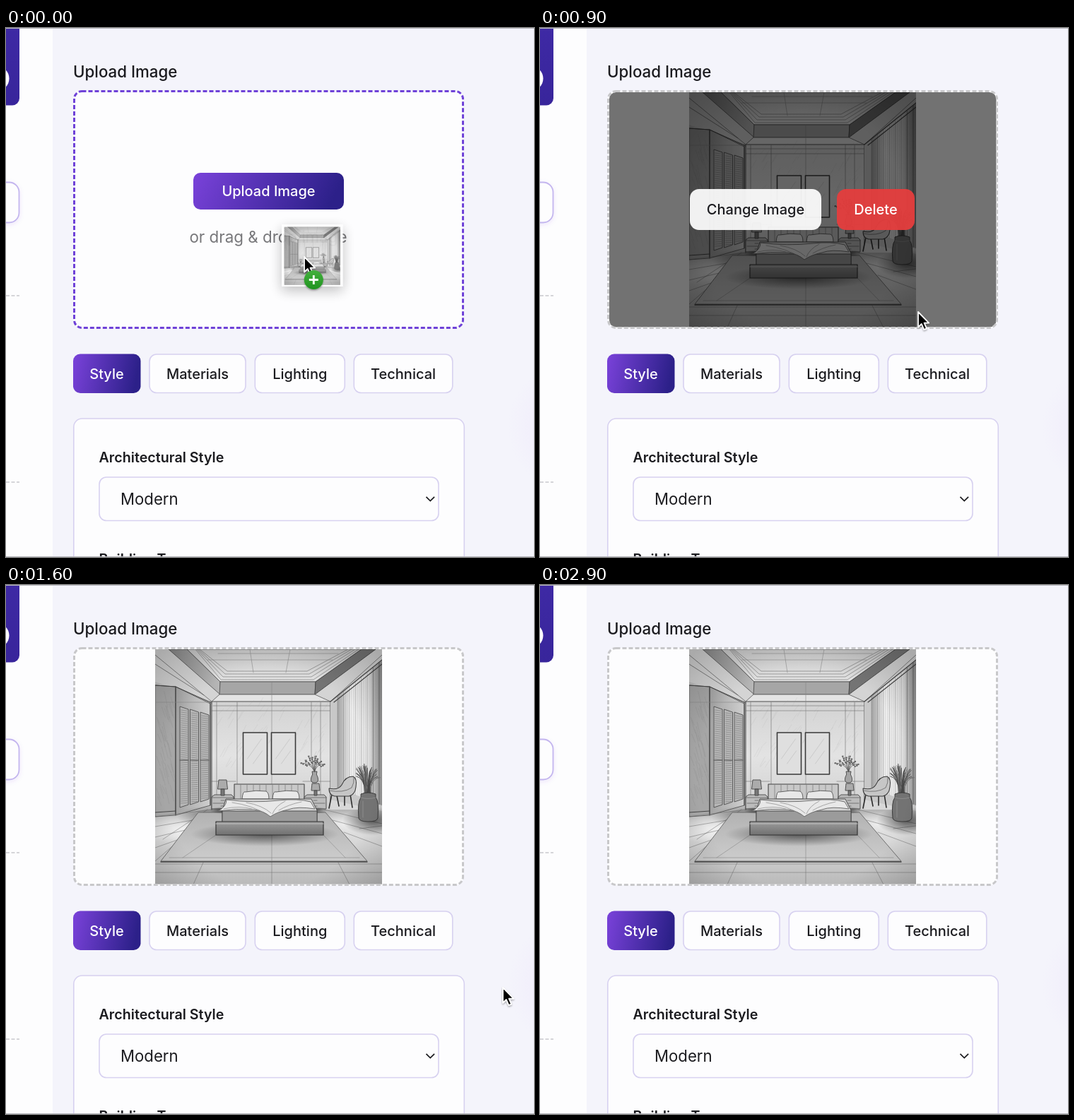
These frames come from a looping animation (747 by 749 pixels, 3 s). An HTML page:

```html
<!DOCTYPE html>
<html lang="en">
<head>
<meta charset="utf-8">
<title>Upload Image</title>
<style>
  html, body { margin: 0; width: 100%; height: 100%; overflow: hidden; background: #f4f4fb; }
  svg { display: block; width: 747px; height: 749px; }
  text { font-family: Inter, Roboto, sans-serif; font-weight: 500; font-size: 20px; fill: #1b1b1f; }
  .mid { text-anchor: middle; }
  .field { fill: #fdfdfe; stroke: #d7d1f0; stroke-width: 1.6; }
</style>
</head>
<body>
<svg id="stage" viewBox="0 0 747 749">
  <defs>
    <linearGradient id="gBrand" y2=".12"><stop stop-color="#7a42da"/><stop offset="1" stop-color="#2c2089"/></linearGradient>
    <linearGradient id="gSide" x2="0" y2="1"><stop stop-color="#3f2aa6"/><stop offset="1" stop-color="#38259b"/></linearGradient>
    <linearGradient id="gWardrobe"><stop stop-color="#a2a2a2"/><stop offset="1" stop-color="#cfcfcf"/></linearGradient>
    <linearGradient id="gCeil" x2="0" y2="1"><stop stop-color="#c6c6c6"/><stop offset="1" stop-color="#e4e4e4"/></linearGradient>
    <linearGradient id="gSoffit"><stop stop-color="#8a8a8a"/><stop offset="1" stop-color="#b8b8b8"/></linearGradient>
    <linearGradient id="gWall" x2="0" y2="1"><stop stop-color="#d2d2d2"/><stop offset=".5" stop-color="#e3e3e3"/><stop offset="1" stop-color="#cfcfcf"/></linearGradient>
    <linearGradient id="gCurtain"><stop stop-color="#a2a2a2"/><stop offset=".3" stop-color="#f2f2f2"/><stop offset=".7" stop-color="#e6e6e6"/><stop offset="1" stop-color="#828282"/></linearGradient>
    <linearGradient id="gFloor" x2="0" y2="1"><stop stop-color="#b4b4b4"/><stop offset=".35" stop-color="#dcdcdc"/><stop offset="1" stop-color="#bababa"/></linearGradient>
    <linearGradient id="gRug" x2="0" y2="1"><stop stop-color="#b2b2b2"/><stop offset="1" stop-color="#cdcdcd"/></linearGradient>
    <linearGradient id="gBase" x2="0" y2="1"><stop stop-color="#9c9c9c"/><stop offset="1" stop-color="#707070"/></linearGradient>
    <radialGradient id="gShade"><stop stop-opacity=".55"/><stop offset="1" stop-opacity="0"/></radialGradient>
    <radialGradient id="gLight"><stop stop-color="#fff" stop-opacity=".7"/><stop offset="1" stop-color="#fff" stop-opacity="0"/></radialGradient>
    <radialGradient id="gEdge" cx=".5" cy=".55" r=".72"><stop offset=".65" stop-opacity="0"/><stop offset="1" stop-opacity=".2"/></radialGradient>
    <radialGradient id="gGlow"><stop offset=".5" stop-color="#f0ebfb" stop-opacity=".7"/><stop offset="1" stop-color="#f0ebfb" stop-opacity="0"/></radialGradient>
    <linearGradient id="gBadge" x2="0" y2="1"><stop stop-color="#43b13d"/><stop offset="1" stop-color="#219321"/></linearGradient>
    <clipPath id="roomClip"><rect x="211" y="91" width="321" height="332.5"/></clipPath>
    <filter id="soft" x="-50%" y="-50%" width="200%" height="200%"><feDropShadow dx="0" dy="6" stdDeviation="9" flood-opacity=".26"/></filter>
    <filter id="thin" x="-50%" y="-50%" width="200%" height="200%"><feDropShadow dx="0" dy="1.5" stdDeviation="1.3" flood-opacity=".35"/></filter>
    <filter id="haze" x="-50%" y="-50%" width="200%" height="200%"><feDropShadow dx="0" dy="2" stdDeviation="3" flood-color="#6f42d8" flood-opacity=".1"/></filter>
    <g id="room" clip-path="url(#roomClip)"></g>
  </defs>

  <rect width="747" height="749" fill="#f4f4fb"/>
  <circle cx="805" cy="565" r="95" fill="url(#gGlow)"/>
  <rect width="66" height="749" fill="#fdfdfe"/>
  <rect x="-40" y="-20" width="59" height="129.5" rx="10" fill="url(#gSide)"/>
  <circle cx="-13" cy="71.5" r="17.5" fill="#fdfdfe"/>
  <rect x="-40" y="218.5" width="58.5" height="57" rx="14" fill="#fdfdfe" stroke="#c3b5ef" stroke-width="1.8" filter="url(#haze)"/>
  <path d="M0 379H19M0 643H19" stroke="#c9c9cd" stroke-width="1.5" stroke-dasharray="5 2.5"/>

  <text x="95" y="70" style="font-size:22.3px">Upload Image</text>
  <rect x="96" y="89" width="551" height="336" rx="12" fill="#fdfdfe"/>
  <g id="prompt">
    <rect x="265" y="205" width="213" height="52" rx="10" fill="url(#gBrand)"/>
    <text class="mid" x="371.5" y="238" style="fill:#fff">Upload Image</text>
    <text class="mid" x="371" y="303.5" style="fill:#77777a;font-weight:400;font-size:22.4px">or drag &amp; drop image</text>
  </g>
  <g id="preview">
    <use href="#room"/>
    <g id="overlay">
      <rect x="98" y="91" width="547.5" height="332.5" rx="9.5" fill="#000" fill-opacity=".55"/>
      <rect x="212" y="228" width="186" height="58" rx="13" fill="#fff" fill-opacity=".92"/>
      <text class="mid" x="305" y="264">Change Image</text>
      <rect x="420" y="228" width="110" height="58" rx="13" fill="#e53e3e" fill-opacity=".95"/>
      <text class="mid" x="475" y="264" style="fill:#fff">Delete</text>
    </g>
  </g>
  <rect id="edge" x="96.5" y="89.5" width="550" height="335" rx="11" fill="none" stroke-width="3" stroke-dasharray="6 3"/>

  <rect x="95" y="461.5" width="95.5" height="55.5" rx="10" fill="url(#gBrand)"/>
  <text class="mid" x="142.5" y="496.5" style="fill:#fff">Style</text>
  <g id="tabs"></g>

  <rect class="field" x="95.8" y="553" width="552.5" height="230" rx="12"/>
  <text x="131.5" y="615" style="font-size:19.7px;font-weight:600">Architectural Style</text>
  <rect class="field" x="132" y="636" width="480" height="61.5" rx="10"/>
  <text x="162" y="675" style="font-size:22.2px;font-weight:400">Modern</text>
  <path d="M594.5 663.8L600.3 669.6L606.1 663.8" fill="none" stroke="#1b1b1f" stroke-width="1.7"/>
  <text x="131.5" y="758.5" style="font-size:19.7px;font-weight:600">Building Type</text>
  <path d="M0 .5H747M0 748.5H747" stroke="#b9b9bf"/>

  <g id="drag">
    <g opacity=".94">
      <rect x="390" y="278" width="86.5" height="88" fill="#fdfdfd" filter="url(#soft)"/>
      <use href="#room" transform="translate(393.5 281.5) scale(.2475) translate(-211 -91)"/>
    </g>
  </g>
  <g id="cursor" filter="url(#thin)">
    <path d="M0 0V21.5L4.8 17L8.3 25L12 23.4L8.6 15.6H15.2Z" fill="#000" stroke="#fff" stroke-width="1.8" stroke-linejoin="round"/>
  </g>
  <g id="badge">
    <circle cx="435.3" cy="356.5" r="13.5" fill="url(#gBadge)" filter="url(#thin)"/>
    <path d="M428.8 356.5H441.8M435.3 350V363" stroke="#fff" stroke-width="2.8"/>
  </g>
</svg>
<script>
const $ = id => document.getElementById(id);
const NS = "http://www.w3.org/2000/svg";

function add(parent, tag, attrs, text) {
  const el = document.createElementNS(NS, tag);
  for (const k in attrs) el.setAttribute(k, attrs[k]);
  if (text) el.textContent = text;
  parent.appendChild(el);
}

for (const [label, x, w] of [["Materials", 203, 136], ["Lighting", 352.3, 127], ["Technical", 492.3, 139.5]]) {
  add($("tabs"), "rect", { class: "field", x, y: 462, width: w, height: 54.5, rx: 10 });
  add($("tabs"), "text", { class: "mid", x: x + w / 2, y: 496.5 }, label);
}

let seed = 7;
const rnd = () => (seed = (seed * 16807) % 2147483647) / 2147483647;
const lerp = (a, b, k) => a + (b - a) * k;

function drawRoom() {
  const room = $("room");
  const shape = (d, fill, stroke = "none", w = 0.9) =>
    add(room, "path", { d, fill, stroke, "stroke-width": w, "stroke-linejoin": "round" });
  const line = (d, stroke = "#666", w = 0.7, opacity = 1) =>
    add(room, "path", { d, fill: "none", stroke, "stroke-width": w, opacity, "stroke-linecap": "round" });
  const spot = (id, cx, cy, rx, ry, opacity = 1) =>
    add(room, "ellipse", { cx, cy, rx, ry, fill: `url(#${id})`, opacity });
  const shade = (...a) => spot("gShade", ...a);
  const light = (...a) => spot("gLight", ...a);

  // shell
  shape("M211 91H532V424H211Z", "#d8d8d8");
  shape("M290 164H460V320H290Z", "url(#gWall)");
  shape("M211 318H532V424H211Z", "url(#gFloor)");

  // tray ceiling
  shape("M211 91H532V106L459 165H291L211 137Z", "#d4d4d4");
  shape("M256 91H503L438 137H303Z", "url(#gCeil)", "#666");
  shape("M256 91L303 137V155L230 91Z", "url(#gSoffit)", "#555");
  shape("M303 137H438L437 155H302Z", "#a6a6a6", "#555");
  shape("M503 91H523L437 155L438 137Z", "#747474", "#444");
  shape("M302 155H437L459 165H291Z", "#e4e4e4", "#666");
  for (let i = 0; i < 4; i++) {
    const y = 122 + i * 4;
    line(`M${274 - i * 2} 91L${313 - i * 3} ${y}H${426 + i * 3}L${484 + i * 5} 91`, "#555", 0.7, 0.7);
  }
  line("M345 91L350 124M402 91L396 124M300 97H470M285 106H462", "#888", 0.6);
  line("M211 99L291 165M211 112L280 156M532 99L459 165", "#555");

  // left wall and wardrobe
  shape("M211 137L291 165V318L211 328Z", "#c2c2c2");
  shape("M211 142L240 144V326L211 328Z", "#a6a6a6", "#555");
  shape("M240 144L289 168V312L240 326Z", "url(#gWardrobe)", "#555");
  for (let i = 0; i < 3; i++) {
    const x = 246 + i * 14.5, top = 172 + i * 4, mid = 248, end = 315 - i * 4;
    shape(`M${x} ${top}L${x + 12} ${top + 4}V${end - 4}L${x} ${end}Z`, "#b6b6b6", "#505050");
    for (let y = top + 5; y < end - 3; y += 3)
      line(`M${x + 1.5} ${y}L${x + 10.5} ${y + (y < mid ? 1.2 : -0.6)}`, "#848484", 0.7);
    line(`M${x} ${mid}H${x + 12}`, "#555", 1);
  }
  line("M211 142L240 144L291 167M240 144V326M289 165V312M211 322L240 320", "#444", 1);
  for (let i = 0; i < 40; i++) {
    const x = 213 + rnd() * 22, y = 150 + rnd() * 150;
    line(`M${x} ${y}l5 ${10 + rnd() * 14}`, "#777", 0.5, 0.35);
  }

  // back wall panelling with pencil hatching
  for (let i = 0; i < 75; i++) {
    const x = 295 + rnd() * 155, y = 170 + rnd() * 95;
    line(`M${x} ${y}l7 -${7 + rnd() * 8}`, "#999", 0.5, 0.3);
  }
  line("M291 165H460M293 171H459M291 178H458M298 166V300M327 166V283M432 166V245M445 166V300M291 278H325M420 278H459", "#666", 0.7, 0.8);
  line("M291 165V318M459 165V305", "#484848", 1);
  line("M376 137V282M211 166H291", "#888", 0.6);

  // pictures
  for (const x of [335.5, 375.5]) {
    shape(`M${x} 209H${x + 34}V268H${x}Z`, "#dfdfdf", "#3a3a3a", 1.6);
    line(`M${x + 6} 246l20 -28M${x + 14} 253l13 -18`, "#bbb", 0.6);
  }

  // window and curtain
  shape("M459 165L532 106V320L459 304Z", "#c8c8c8");
  shape("M469 158L532 107V312L469 287Z", "url(#gCurtain)");
  for (let i = 0; i < 23; i++) {
    const x = 469 + i * 2.8, top = 158 - (x - 469) * 0.81;
    line(`M${x} ${top}V${287 + (x - 469) * 0.4}`, i % 3 ? "#aaa" : "#666", i > 17 ? 1.3 : 0.6, 0.65);
  }
  line("M459 165L532 106M464 166L532 112", "#444", 1.2);

  // floor tiles and rug
  light(250, 345, 60, 22);
  light(480, 338, 50, 18);
  line("M211 328L291 318M211 342L276 331M211 357L262 345M450 318L532 338M462 333L532 352M478 350L532 370M211 407H532M211 395H532M222 360L285 318M211 391L250 357M279 393L265 424M470 393L486 424M376 354V424M500 345L532 341M211 372L245 360", "#666", 0.7, 0.7);
  shade(292, 328, 50, 16, 0.7);
  shade(518, 334, 42, 20);
  shape("M272 322H452L511 391H219Z", "url(#gRug)", "#666");
  line("M219 392H511", "#444", 1.5);
  line("M231 386H500M376 354V391M297 354L250 386M449 354L480 386", "#888", 0.6);
  shade(366, 353, 105, 17);

  // headboard, tables and lamps
  shape("M323 282H422V306H323Z", "#c8c8c8", "#444", 1.1);
  for (let x = 332; x < 420; x += 9) line(`M${x} 283V304`, "#777");
  for (const x of [291, 422]) {
    shape(`M${x} 300L${x + 4} 297H${x + 28}L${x + 31} 300V317H${x}Z`, "#bcbcbc", "#444");
    line(`M${x} 301H${x + 31}M${x + 2} 309H${x + 29}M${x + 13} 305h5M${x + 13} 313h5`, "#555");
    shade(x + 15, 319, 18, 5);
  }
  shape("M301 276H312L313.5 289H299.5Z", "#ababab", "#444");
  shape("M304 289H309V298H304Z", "#777", "#444");
  shape("M433 281H443L444 291H432Z", "#ababab", "#444");
  shape("M436 291H440V298H436Z", "#777", "#444");

  // bed
  for (const x of [334, 377])
    shape(`M${x} 303Q${x + 1} 291 ${x + 5} 293Q${x + 20} 290 ${x + 34} 292Q${x + 38} 294 ${x + 38} 303Z`, "#e8e8e8", "#555");
  shape("M311 303H432L440 319V336H306V319Z", "#d4d4d4", "#444");
  shape("M306 320H440V336H306Z", "#9b9b9b", "#444");
  shape("M297 335H449V354H297Z", "url(#gBase)", "#333", 1.2);
  line("M297 338H449", "#c4c4c4", 1.2);
  shape("M312 304Q350 309 386 305Q413 302 431 307L437 317Q412 313 399 318Q384 321 374 328Q365 320 351 318Q326 316 300 320Q312 314 312 304Z", "#e8e8e8", "#666");
  line("M320 308Q349 312 369 325M340 308Q363 312 375 323M395 306Q381 313 377 324M418 307Q399 311 386 319M308 317Q330 312 348 317", "#888");

  // vase with twigs
  shape("M433 264H440Q438 268 441 272Q443 279 438 280H435Q430 279 432 272Q435 268 433 264Z", "#a4a4a4", "#444");
  for (let i = 0; i < 8; i++) {
    const x = 418 + i * 4.7, y = 249 - Math.sin(i / 7 * Math.PI) * 9 + rnd() * 5;
    line(`M436.5 264Q${lerp(436, x, 0.3)} 252 ${x} ${y}`, "#555", 0.7);
    for (let k = 0; k < 4; k++)
      add(room, "circle", { cx: lerp(436, x, 0.55 + k * 0.15) + rnd() * 3 - 1, cy: lerp(260, y, 0.5 + k * 0.16), r: 1.2, fill: "#666" });
  }

  // armchair
  line("M461 296L457 316M468 298L471 313M487 296L490 315M479 297L479 312", "#2b2b2b", 1.6);
  shape("M457 288Q470 291 475 283Q480 271 491 271Q497 274 495 286Q494 297 485 299H465Q457 298 457 288Z", "#c6c6c6", "#3a3a3a", 1.1);
  line("M457 291Q477 295 489 287Q493 280 492 273", "#555");

  // planter with grass
  for (let i = 0; i < 38; i++) {
    const x = lerp(494, 531, rnd()), y = 247 + Math.abs(x - 511) * 0.8 + rnd() * 15;
    line(`M${507 + rnd() * 10} 296Q${lerp(511, x, 0.35)} 272 ${x} ${y}`, rnd() < 0.5 ? "#444" : "#707070", 0.9);
  }
  shape("M502 296Q512 292 523 296V301Q528 306 526 330Q525 335 512 335Q500 335 499 330Q497 307 502 301Z", "#737373", "#333");
  line("M502 301Q512 304 523 301M505 306V329", "#999");

  add(room, "rect", { x: 211, y: 91, width: 321, height: 333, fill: "url(#gEdge)" });
}
drawRoom();

const track = [
  [600, 422, 324], [700, 432, 330], [800, 478, 358], [900, 535, 402], [1000, 593, 455],
  [1100, 648, 510], [1200, 681, 546], [1300, 698, 564], [1400, 703, 570]
];

function cursorAt(t) {
  const i = track.findIndex(p => t <= p[0]);
  if (i === 0) return track[0].slice(1);
  if (i < 0) return track[track.length - 1].slice(1);
  const [t0, x0, y0] = track[i - 1], [t1, x1, y1] = track[i];
  const k = (t - t0) / (t1 - t0);
  return [lerp(x0, x1, k), lerp(y0, y1, k)];
}

const clamp = v => Math.min(1, Math.max(0, v));
const smooth = k => k * k * (3 - 2 * k);
const show = (id, on) => $(id).setAttribute("display", on ? "inline" : "none");
const PURPLE = [111, 66, 216], GREY = [200, 200, 202];
const LOOP = 3000, STEP = 100, RELEASE = 300, DROP = 400, LEAVE = 969, HIDE = 2700;
const FADE = 140;

function render(t) {
  const dropped = t >= DROP;
  show("prompt", !dropped);
  show("drag", !dropped);
  show("badge", !dropped);
  show("preview", dropped);
  show("cursor", t < HIDE);

  const mix = smooth(clamp((t - RELEASE) / FADE));
  $("edge").setAttribute("stroke", `rgb(${PURPLE.map((c, i) => Math.round(lerp(c, GREY[i], mix)))})`);
  $("overlay").setAttribute("opacity", 1 - smooth(clamp((t - LEAVE) / FADE)));
  $("cursor").setAttribute("transform", `translate(${cursorAt(t)})`);
}

function tick() {
  render(Math.floor((performance.now() % LOOP) / STEP) * STEP);
  requestAnimationFrame(tick);
}
tick();
</script>
</body>
</html>
```
